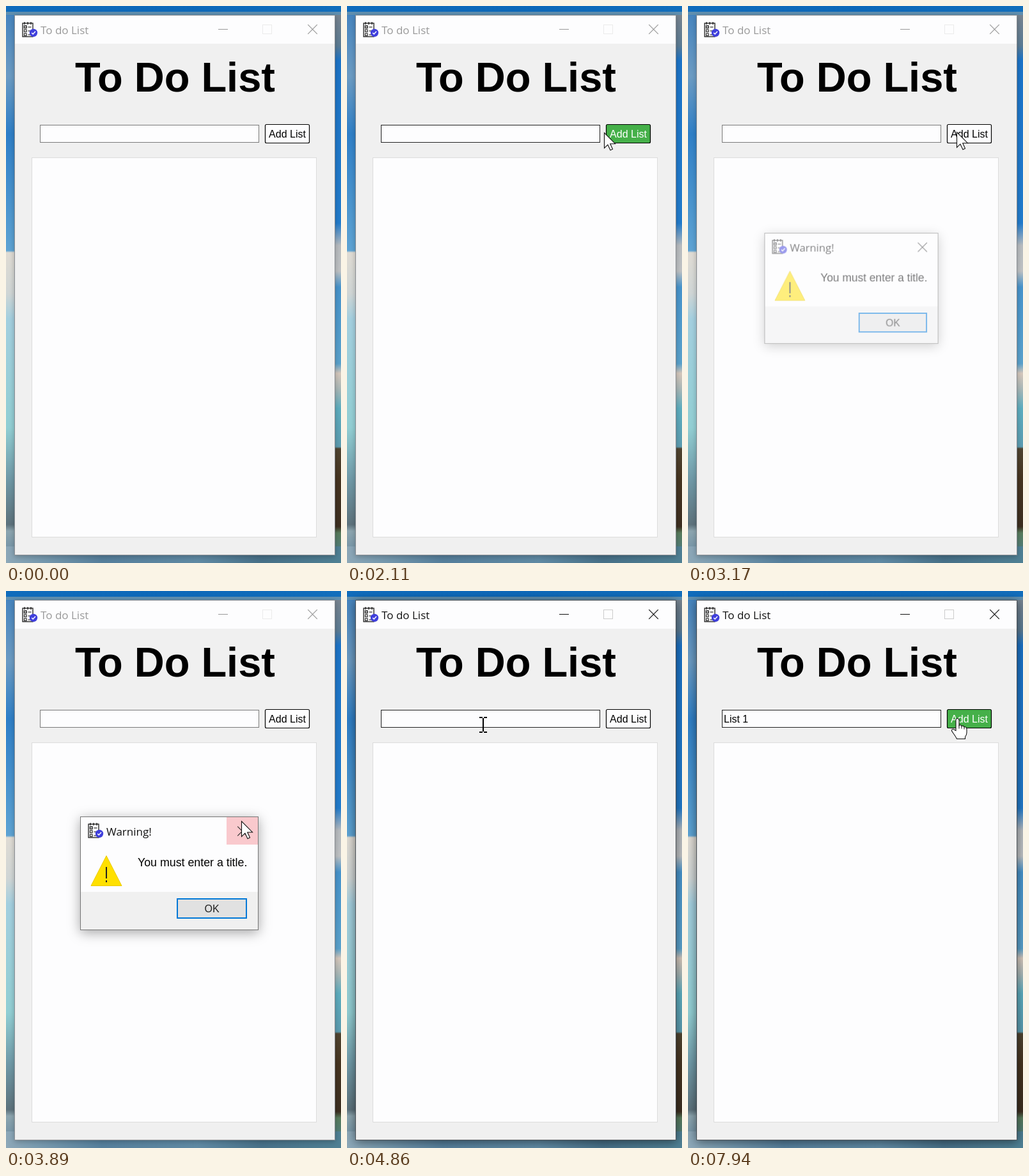
Recreate the animation shown at these times as an HTML page with a canvas. Size 524 px wide and 872 px high, loop 7990 ms.

```html
<!DOCTYPE html>
<html lang="en">
<head>
<meta charset="utf-8">
<title>To do List</title>
<style>
html, body { margin: 0; width: 100%; height: 100%; overflow: hidden; }
canvas { display: block; }
</style>
</head>
<body>
<canvas id="stage" width="524" height="872"></canvas>
<script>
const LOOP = 7990;
const W = 524, H = 872;
const SANS = '"Liberation Sans", Arial, sans-serif';
const UI = '"Open Sans", "Noto Sans", sans-serif';
const PAPER = '#fdfdfe', GRAY = '#f0f0f0';

const stage = document.getElementById('stage').getContext('2d');
const layer = document.createElement('canvas');
layer.width = W;
layer.height = H;
const popup = layer.getContext('2d');

const INPUT = { x: 53, y: 186, w: 343, h: 28 };
const BUTTON = { x: 405, y: 185, w: 70, h: 30 };
const CLOSE = { x: 345, y: 354, w: 49, h: 43 };

// Dialog and focus times
const OPEN = 3110, SHUT = 4290, FADE = 120;
const FOCUS = 5050, BLINK = 530;

// Pointer stops: time, x, y
const PATH = [
  [130, 545, 690], [630, 400, 400], [930, 400, 400], [1690, 300, 200],
  [1770, 300, 200], [2110, 402, 198], [2540, 420, 197], [3380, 420, 197],
  [3890, 368, 360], [4140, 368, 365], [4400, 368, 365], [4940, 203, 199],
  [5070, 200, 198], [7690, 200, 198], [7940, 421, 200]
];

// Typed text: time, content
const TYPED = [[6000, 'L'], [6250, 'Li'], [6380, 'Lis'], [6630, 'List'], [6850, 'List '], [7230, 'List 1']];

const ARROW = new Path2D('M0 0V24L5.4 18.7L9.5 27.2L13 25.6L9.2 17.2H17Z');
const HAND = new Path2D('M-2.5 18V2Q-2.5-1 0-1Q2.5-1 2.5 2V10Q5 8 6.5 11Q9 9.5 10.5 12.5Q13.5 11.5 14.5 15V21Q14.5 25 12 28V31H-1Q-3 27-6 23L-9 18.5Q-9 15-6 16Z');

const clamp = v => Math.min(1, Math.max(0, v));
const ramp = (t, from, length) => clamp((t - from) / length);
const smooth = v => v * v * (3 - 2 * v);
const inside = (p, r, pad = 0) =>
  p.x >= r.x - pad && p.x <= r.x + r.w + pad && p.y >= r.y - pad && p.y <= r.y + r.h + pad;

function pointerAt(t) {
  if (t < PATH[0][0]) return { x: -99, y: -99 };
  const i = PATH.findIndex(stop => stop[0] > t);
  if (i < 0) return { x: 421, y: 200 };
  const [t0, x0, y0] = PATH[i - 1], [t1, x1, y1] = PATH[i];
  const k = smooth((t - t0) / (t1 - t0));
  return { x: x0 + (x1 - x0) * k, y: y0 + (y1 - y0) * k };
}

function fill(c, color, x, y, w, h) {
  c.fillStyle = color;
  c.fillRect(x, y, w, h);
}

function frame(c, color, r, back, width = 1) {
  fill(c, back, r.x, r.y, r.w, r.h);
  c.strokeStyle = color;
  c.lineWidth = width;
  c.strokeRect(r.x + width / 2, r.y + width / 2, r.w - width, r.h - width);
}

function text(c, str, x, y, font, color, align = 'left') {
  c.font = font;
  c.fillStyle = color;
  c.textAlign = align;
  c.fillText(str, x, y);
}

function lines(c, color, width, ...paths) {
  c.strokeStyle = color;
  c.lineWidth = width;
  c.beginPath();
  for (const [x, y, ...rest] of paths) {
    c.moveTo(x, y);
    for (let i = 0; i < rest.length; i += 2) c.lineTo(rest[i], rest[i + 1]);
  }
  c.stroke();
}

function cross(c, x, y, color) {
  const r = 7.3;
  lines(c, color, 1.2, [x - r, y - r, x + r, y + r], [x - r, y + r, x + r, y - r]);
}

function gradient(stops, vertical) {
  const g = vertical ? stage.createLinearGradient(0, 0, 0, H) : stage.createLinearGradient(0, 0, W, 0);
  for (const [at, color] of stops) g.addColorStop(at / (vertical ? H : W), color);
  return g;
}

const LEFT = gradient([
  [0, '#0f6cbc'], [16, '#4886c0'], [110, '#6c9cc4'], [200, '#2f80c8'], [383, '#5ea4d4'],
  [386, '#e0dcd4'], [450, '#d0d6d6'], [490, '#a4d0e0'], [660, '#92cfd4'],
  [740, '#709aa8'], [812, '#5d727c'], [822, '#8da6b0'], [872, '#6488a0']
], true);
const RIGHT = gradient([
  [0, '#0f6cbc'], [14, '#788490'], [62, '#5c7c94'], [85, '#1c74c8'], [340, '#227ccc'],
  [375, '#b8bcc0'], [415, '#bfc2c4'], [440, '#4794cc'], [560, '#5aa2cc'], [575, '#d6c8bc'],
  [600, '#a9b8b8'], [630, '#5daec0'], [690, '#5c9cb0'], [693, '#504430'], [740, '#463420'],
  [815, '#3c2e20'], [825, '#587c5c'], [872, '#4b7d94']
], true);
const SEA = gradient([[0, '#8da8b8'], [45, '#7a9cb0'], [150, '#557f9c'], [300, '#5f8aa4'],
  [400, '#477088'], [524, '#4f8094']], false);
const SKY = gradient([[0, '#106cbc'], [260, '#0d68b8'], [524, '#126ebc']], false);

function desktop() {
  fill(stage, LEFT, 0, 0, W / 2, H);
  fill(stage, RIGHT, W / 2, 0, W / 2, H);
  fill(stage, SEA, 0, 846, W, 26);
  fill(stage, SKY, 0, 0, W, 9);
  fill(stage, '#5f8fb0', 0, 9, W, 5);
}

function listIcon(c, x, y) {
  const ink = '#2b2b2b';
  c.strokeStyle = ink;
  c.lineWidth = 1.4;
  c.strokeRect(x + 1, y + 2, 16, 21);
  lines(c, ink, 1.5, [x + 4, y, x + 4, y + 4], [x + 9, y, x + 9, y + 4], [x + 14, y, x + 14, y + 4]);
  for (let i = 0; i < 3; i++) {
    const row = y + 6 + i * 6;
    c.strokeRect(x + 3.5, row, 3.5, 3.5);
    lines(c, ink, 1.2, [x + 9.5, row + 2, x + 14.5, row + 2]);
  }
  c.fillStyle = '#4040dc';
  c.beginPath();
  c.arc(x + 18, y + 17, 6.2, 0, 7);
  c.fill();
  lines(c, '#fff', 1.4, [x + 15.2, y + 17, x + 17.2, y + 19, x + 21, y + 14.8]);
}

function mainWindow(active) {
  const c = stage;
  c.save();
  c.shadowColor = active ? 'rgba(0,0,0,.5)' : 'rgba(0,0,0,.25)';
  c.shadowBlur = active ? 14 : 8;
  c.shadowOffsetY = 2;
  fill(c, active ? '#50565c' : '#8b8f94', 13, 14, 502, 846);
  c.restore();
  fill(c, GRAY, 14, 15, 500, 844);
  fill(c, PAPER, 14, 15, 500, 44);

  const ink = active ? '#111' : '#999';
  listIcon(c, 25, 25);
  text(c, 'To do List', 54, 44, '17px ' + UI, ink);
  lines(c, ink, 1, [332, 36.5, 347, 36.5]);
  c.strokeStyle = active ? '#ccc' : '#ebebeb';
  c.strokeRect(401.5, 29.5, 14, 14);
  cross(c, 479.5, 36.5, ink);

  text(c, 'To Do List', 264.5, 134, 'bold 65px ' + SANS, '#000', 'center');
  frame(c, '#dcdcdc', { x: 40, y: 237, w: 446, h: 595 }, PAPER);
}

function inputBox(t, hover) {
  frame(stage, hover || t >= FOCUS ? '#222' : '#7a7a7a', INPUT, PAPER);
  if (t < FOCUS) return;
  let since = FOCUS, value = '';
  for (const [at, str] of TYPED) if (t >= at) [since, value] = [at, str];
  text(stage, value, 56, 206, '16px ' + SANS, '#000');
  if (Math.floor((t - since) / BLINK) % 2 === 0) {
    const x = Math.round(56 + stage.measureText(value).width);
    fill(stage, '#111', x, 191, 1, 18);
  }
}

function addButton(hover) {
  const c = stage;
  c.beginPath();
  c.roundRect(BUTTON.x + .5, BUTTON.y + .5, BUTTON.w - 1, BUTTON.h - 1, 2);
  c.fillStyle = hover ? '#45b049' : PAPER;
  c.fill();
  c.strokeStyle = '#000';
  c.lineWidth = 1.2;
  c.stroke();
  text(c, 'Add List', 440, 206, '16px ' + SANS, hover ? '#fff' : '#000', 'center');
}

function dialog(alpha, hot, crossColor) {
  const c = popup;
  c.clearRect(0, 0, W, H);
  c.save();
  c.shadowColor = 'rgba(0,0,0,.35)';
  c.shadowBlur = 18;
  c.shadowOffsetY = 4;
  fill(c, '#777', 116, 353, 279, 178);
  c.restore();
  fill(c, PAPER, 117, 354, 277, 117);
  fill(c, GRAY, 117, 471, 277, 59);

  listIcon(c, 128, 363);
  text(c, 'Warning!', 157, 383, '17px ' + UI, '#111');
  c.globalAlpha = hot;
  fill(c, '#e81123', CLOSE.x, CLOSE.y, CLOSE.w, CLOSE.h);
  c.globalAlpha = 1;
  cross(c, 369.5, 376, crossColor);

  c.fillStyle = '#ffe000';
  c.strokeStyle = '#ecca00';
  c.lineWidth = 1;
  c.beginPath();
  c.moveTo(157, 414.5);
  c.lineTo(181, 461.5);
  c.lineTo(133, 461.5);
  c.closePath();
  c.fill();
  c.stroke();
  fill(c, '#222', 156, 432, 2, 18);
  fill(c, '#222', 156, 453, 2, 3);

  text(c, 'You must enter a title.', 206, 431, '17.8px ' + SANS, '#000');
  frame(c, '#0078d7', { x: 267, y: 481, w: 110, h: 32 }, '#e1e1e1', 2);
  text(c, 'OK', 322, 503, '16px ' + SANS, '#222', 'center');

  const scale = .95 + .05 * alpha;
  stage.save();
  stage.globalAlpha = alpha;
  stage.translate(255.5, 441);
  stage.scale(scale, scale);
  stage.drawImage(layer, -255.5, -441);
  stage.restore();
}

function pointer(p, shape) {
  const c = stage;
  c.save();
  c.translate(Math.round(p.x), Math.round(p.y));
  if (shape === 'beam') {
    lines(c, '#000', 2, [-6, -11, -1, -11], [1, -11, 6, -11], [0, -10, 0, 11], [-6, 12, -1, 12], [1, 12, 6, 12]);
  } else {
    const path = shape === 'hand' ? HAND : ARROW;
    c.translate(.5, .5);
    c.fillStyle = '#fff';
    c.strokeStyle = '#111';
    c.lineWidth = 1.1;
    c.fill(path);
    c.stroke(path);
    if (shape === 'hand') lines(c, '#111', 1, [2.5, 10, 2.5, 15], [6.5, 11, 6.5, 15], [10.5, 12.5, 10.5, 16]);
  }
  c.restore();
}

function draw(t) {
  const p = pointerAt(t);
  const alpha = ramp(t, OPEN, FADE) - ramp(t, SHUT, FADE);
  const modal = t >= OPEN && t < SHUT;
  const active = t >= 2900 && !modal;
  const hot = t < SHUT ? .22 * ramp(t, 3850, 40) + .78 * ramp(t, 3900, 120) : 0;

  desktop();
  mainWindow(active);
  inputBox(t, !modal && inside(p, INPUT, 7));
  addButton(!modal && inside(p, BUTTON, 5));
  if (alpha > 0) dialog(alpha, hot, hot > .6 || t >= SHUT ? '#fff' : '#333');

  let shape = 'arrow';
  if (!modal && inside(p, INPUT)) shape = 'beam';
  if (!modal && inside(p, BUTTON)) shape = 'hand';
  pointer(p, shape);
}

const start = performance.now();
function tick() {
  draw((performance.now() - start) % LOOP);
  requestAnimationFrame(tick);
}
tick();
</script>
</body>
</html>
```
